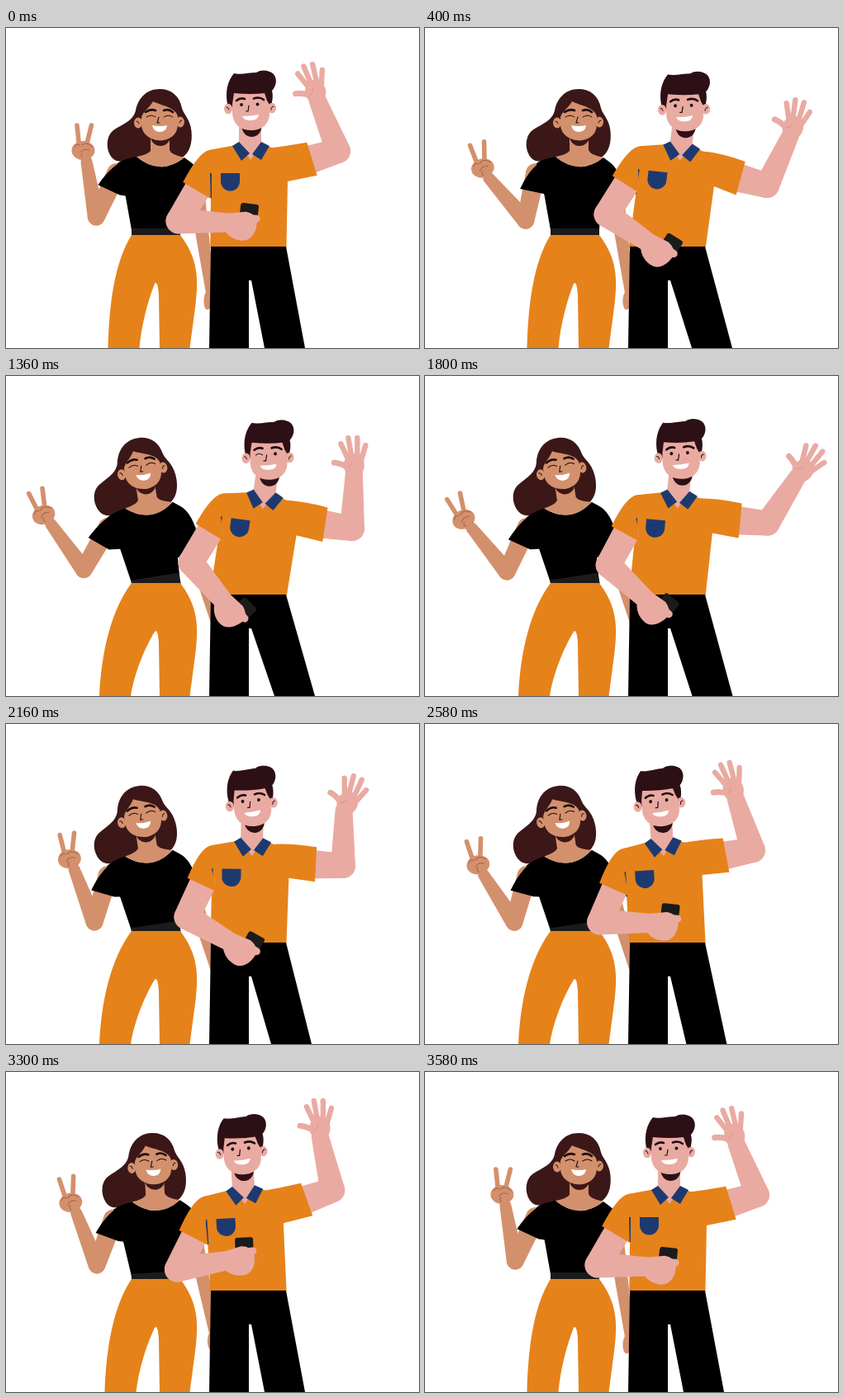
An HTML page with a canvas for the animation above (3.6 s loop, 500 by 388 pixels).

```html
<!DOCTYPE html>
<html lang="en">
<head>
<meta charset="utf-8">
<title>Waving friends</title>
<style>
html, body { margin: 0; width: 100%; height: 100%; overflow: hidden; background: #fff; }
canvas { display: block; width: 500px; height: 388px; }
</style>
</head>
<body>
<canvas id="stage" width="500" height="388"></canvas>
<script>
const LOOP = 3600, RAD = Math.PI / 180;
const ctx = document.getElementById('stage').getContext('2d');
const ORANGE = '#e6821a', BLACK = '#000', NAVY = '#1d3a70', BELT = '#1b1b1b';
const TAN = '#d3906c', TAN_LINE = '#a95f45', PINK = '#e9aaa2';
const HAIR_W = '#3b1718', HAIR_M = '#2d1016', INK = '#1c0c10';

// Each track is [time, value] pairs, smoothly joined, at rest at the loop ends.
const tracks = {
  wLean: [[0, 0], [400, 0], [860, -4.7], [1360, -8.6], [2500, -8.6], [3020, -7]],
  wUpper: [[0, 25], [400, 12], [860, 16.6], [1360, 30], [1640, 28], [2160, 16.3], [3020, 15]],
  wFore: [[0, 10], [400, 41], [620, 47], [860, 40], [1180, 32], [1360, 36], [1640, 43], [2160, 21], [2300, 18], [2800, 43], [3020, 37]],
  wHand: [[0, 0], [400, -15], [860, -28], [1200, -20], [1360, -21], [1700, -28], [2160, -8], [2400, -4], [2850, -28], [3020, -26]],
  mLean: [[0, 0], [400, 6.7], [700, 8], [1400, 8], [2160, 1], [3020, -7]],
  mLeg: [[0, 0], [400, 10], [700, 12], [1400, 12], [2160, 8], [3020, 0]],
  mTilt: [[0, 0], [1500, 0], [2160, -4], [3020, -5]],
  waveX: [[0, 402], [400, 414], [700, 416], [860, 416], [1360, 419], [2160, 408], [3020, 389]],
  waveY: [[0, 149], [400, 191], [700, 193], [860, 193], [1360, 185], [2160, 172], [3020, 138]],
  waveFore: [[0, -22], [400, 25], [620, 33], [860, 21], [1250, 1], [1360, 2], [1800, 33], [2160, 1], [2450, -20], [3020, -8], [3100, -8]],
  waveHand: [[0, -13], [400, 17], [800, 60], [860, 60], [1360, 0], [1450, -2], [1900, 45], [2160, 25], [2550, -15], [3020, 2], [3150, 4]],
  holdX: [[0, 209], [400, 220], [700, 224], [1400, 224], [2160, 219], [3020, 206]],
  holdY: [[0, 234], [400, 226], [700, 226], [1400, 226], [2160, 234], [3020, 244]],
  holdFore: [[0, 2], [400, 34], [700, 50], [1400, 50], [2160, 30], [3020, -21]]
};
for (const k in tracks) tracks[k].push([LOOP, tracks[k][0][1]]);

function slope(keys, i) {
  if (i === 0 || i === keys.length - 1) return 0;
  const [a, b, c] = [keys[i - 1], keys[i], keys[i + 1]];
  const d1 = (b[1] - a[1]) / (b[0] - a[0]), d2 = (c[1] - b[1]) / (c[0] - b[0]);
  return d1 * d2 <= 0 ? 0 : 2 * d1 * d2 / (d1 + d2);
}

function sample(keys, t) {
  let i = 0;
  while (i < keys.length - 2 && t >= keys[i + 1][0]) i++;
  const [t0, v0] = keys[i], [t1, v1] = keys[i + 1], h = t1 - t0, u = (t - t0) / h;
  const u2 = u * u, u3 = u2 * u;
  return v0 * (2 * u3 - 3 * u2 + 1) + v1 * (3 * u2 - 2 * u3)
    + h * (slope(keys, i) * (u3 - 2 * u2 + u) + slope(keys, i + 1) * (u3 - u2));
}

function turn(x, y, deg, draw) {
  ctx.save();
  ctx.translate(x, y);
  ctx.rotate(deg * RAD);
  ctx.translate(-x, -y);
  draw();
  ctx.restore();
}

function place(x, y, deg, draw) {
  ctx.save();
  ctx.translate(x, y);
  ctx.rotate(deg * RAD);
  draw();
  ctx.restore();
}

function spin(x, y, cx, cy, deg) {
  const c = Math.cos(deg * RAD), s = Math.sin(deg * RAD);
  return [cx + (x - cx) * c - (y - cy) * s, cy + (x - cx) * s + (y - cy) * c];
}

function fill(d, color) {
  ctx.fillStyle = color;
  ctx.fill(new Path2D(d));
}

function line(d, color, width, cap = 'round') {
  ctx.strokeStyle = color;
  ctx.lineWidth = width;
  ctx.lineCap = cap;
  ctx.lineJoin = 'round';
  ctx.stroke(new Path2D(d));
}

function oval(x, y, rx, ry, color, deg = 0) {
  ctx.fillStyle = color;
  ctx.beginPath();
  ctx.ellipse(x, y, rx, ry, deg * RAD, 0, 2 * Math.PI);
  ctx.fill();
}

// Tapered limb: the hull of two circles.
function limb([x1, y1], r1, [x2, y2], r2, color) {
  const a = Math.atan2(y2 - y1, x2 - x1);
  const b = Math.acos((r1 - r2) / Math.hypot(x2 - x1, y2 - y1));
  ctx.fillStyle = color;
  ctx.beginPath();
  ctx.arc(x1, y1, r1, a + b, a - b + 2 * Math.PI);
  ctx.arc(x2, y2, r2, a - b, a + b);
  ctx.fill();
}

// Point at a distance from p; angle 0 is up, positive to the right.
const reach = ([x, y], deg, len) => [x + Math.sin(deg * RAD) * len, y - Math.cos(deg * RAD) * len];

// Hem of a sleeve lying back from the elbow along angle a.
function hem([x, y], a, back, half) {
  const c = Math.cos(a), s = Math.sin(a), mx = x - c * back, my = y - s * back;
  return { mid: [mx, my], left: [mx + s * half, my - c * half], right: [mx - s * half, my + c * half] };
}

function womanHead() {
  oval(187, 131, 12, 12, HAIR_W);
  oval(160, 115, 5, 6.5, TAN);
  oval(211, 114, 5, 6.5, TAN);
  fill('M164 108C166 101 173 98 178 89C188 94 205 96 208 107V118C207 130 198 136 187 136.5C176 136 165 130 164 118Z', TAN);
  line('M158 113q2-1 3 3M213 112q-2-1-3 3', INK, 1);
  line('M169 102Q175 97.500 181 100M191 100Q197 97.500 202 102', INK, 2.6);
  line('M170 108Q176 104 181 108M191 108Q197 104 202 108', INK, 1);
  line('M185 108L183 115H186', INK, 1.1);
  fill('M177 118Q187 120 195 118Q194 126 186 126Q179 126 177 118Z', '#fff');
}

function peaceHand() {
  line('M-9-20L-11.500-44', TAN, 5.6);
  line('M0-20L6-44', TAN, 5.6);
  oval(-4, -13.5, 14, 11.5, TAN);
  line('M-14-18Q-12-23-8-20M-6-20Q0-25 7-18M-8-11Q-4-17 3-14M-5-10Q-8-7-5-5', TAN_LINE, 1);
}

function woman(p) {
  const px = 181, py = 250, lean = p.wLean;
  turn(px, py, lean, () => {
    limb([230, 195], 10, [247, 318], 5.5, TAN);
    oval(245, 329, 5.5, 12.5, TAN, 6);
    fill('M186 74C170 74 160 85 157 100C154 113 140 117 130 124C121 131 120 148 129 158C136 165 150 161 160 156L212 158C222 152 226 140 224.500 125C223 110 215 105 213 97C210 82 200 74 186 74Z', HAIR_W);
  });
  const shoulder = spin(134, 176, px, py, lean);
  const elbow = reach(shoulder, 180 + p.wUpper, 58.5);
  const wrist = reach(elbow, -p.wFore, 68);
  limb(shoulder, 12, elbow, 10.5, TAN);
  limb(elbow, 10.5, wrist, 7, TAN);
  place(...wrist, p.wHand, peaceHand);
  const a = Math.atan2(elbow[1] - shoulder[1], elbow[0] - shoulder[0]);
  const h = hem(elbow, a, 36, 14.5);
  const top = spin(150, 158, px, py, lean), bend = spin(130, 163, px, py, lean);
  const pit = spin(148, 204, px, py, lean), mid = spin(165, 175, px, py, lean);
  fill(`M${top}Q${bend} ${h.right}L${h.left}L${pit}L${mid}Z`, BLACK);
  turn(px, py, lean, () => {
    fill('M158 156Q142 159 135 164L144 200L152 245H211L212 225L230 215L239 195Q236 172 224 163L216 157Q187 180 158 156Z', BLACK);
    fill('M152 243H211V258H152Z', BELT);
    fill('M175 130V149Q171 154 158 156Q187 180 216 157Q200 154 198 148V130Z', TAN);
    womanHead();
  });
  const s = lean * 1.22;
  fill(`M152 251H211C233 280 233 305 229.500 335L222.500 388H186L185 325Q184 306 180 310C${172 + s * .4} 330 ${164 + s * .8} 360 ${161.5 + s} 388H${123.5 + s}C${125 + s * .9} 335 ${131 + s * .4} 285 152 251Z`, ORANGE);
}

function manHead(wink) {
  oval(297.5, 119, 12, 13, HAIR_M);
  fill('M268 92C265 76 269 63 276 55C283 57 295 54 303 54C309 50 319 51 324 56C329 62 327 71 322 76C324 83 322 91 320 98L272 98Z', HAIR_M);
  oval(269, 98, 5, 6.3, PINK);
  oval(322, 97, 5, 6.3, PINK);
  fill('M274 92L276 79Q297 81 313 79L316 88L319 93V105C318 119 307 124 297 124C284 124 275 117 274 104Z', PINK);
  line('M267 96q2-1 3 3M324 95q-3 0-3 4', INK, 1);
  line('M279 88Q284 84 289 86M300 85.500Q307 83 312 87', INK, 2.6);
  if (wink) line('M281 94Q285 91 289 94', INK, 1.1);
  else oval(285, 93, 1.9, 2.1, INK);
  oval(304.5, 92.5, 1.9, 2.1, INK);
  line('M294 94L293 101H290.500', INK, 1.2);
  fill('M286 107Q297 107 306 105Q305 112 297 112Q288 112.500 286 107Z', '#fff');
}

function openHand() {
  oval(0, -10, 12.5, 14.5, PINK);
  line('M-7-17L-16-36M-3-20L-7-43M4-20L4-43M9-17L14-34', PINK, 6.4);
  line('M-6-6Q-14-12-24-13', PINK, 7);
  line('M-8-7Q-3-9-2-14', '#d98d88', .8);
}

function holdHand(fore) {
  place(24, -16, 5 - fore * .2, () => {
    ctx.fillStyle = BELT;
    ctx.beginPath();
    ctx.roundRect(-11, -8, 22, 18, 3);
    ctx.fill();
  });
  fill('M-4-11L20-14Q31-12 34-4C34 12 27 21 17 21C8 21 1 17-4 11Z', PINK);
  line('M18-6H33', PINK, 9);
}

function man(p, wink) {
  const px = 294, py = 265, lean = p.mLean;
  const at = (x, y) => spin(x, y, px, py, lean);

  const elbow = [p.waveX, p.waveY], sh = at(341, 161);
  const a = Math.atan2(elbow[1] - sh[1], elbow[0] - sh[0]) - 6 * RAD;
  const cuff = hem(elbow, a, 33, 21);
  const wrist = reach(elbow, p.waveFore, 67);
  limb(cuff.mid, 17, elbow, 15, PINK);
  limb(elbow, 15, wrist, 10.5, PINK);
  place(...wrist, p.waveHand, openHand);

  ctx.save();
  ctx.beginPath();
  ctx.rect(0, 0, 500, 266);
  ctx.clip();
  fill(`M${at(300, 148)}L${at(316, 146)}Q${at(340, 143)} ${cuff.left}L${cuff.right}L${at(341, 186)}L${at(300, 200)}Z`, ORANGE);
  turn(px, py, lean, () => {
    fill('M278 142L246 148L240 165L248 205L247 290H339L341 186L335 150L316 143Z', ORANGE);
    line('M248 176V206', NAVY, 2, 'butt');
    fill('M260 176H283V186A11.500 11.500 0 0 1 260 186Z', NAVY);
  });
  ctx.restore();

  const s = p.mLeg;
  fill(`M248 265H339L${362 + s} 388H${313 + s}L297 306H294V388H246Z`, BLACK);

  turn(px, py, lean, () => {
    fill('M282 112H309V142L296 160L282 141Z', PINK);
    fill('M274 143L282 138L295 152L285 161ZM309 138L319 143L309 160L298 153Z', NAVY);
    turn(296, 110, p.mTilt - lean, () => manHead(wink));
  });

  const bend = [p.holdX, p.holdY], root = at(250, 165);
  const b = Math.atan2(bend[1] - root[1], bend[0] - root[0]);
  const sleeve = hem(bend, b, 43, 19.5);
  const grip = reach(bend, p.holdFore + 90, 61);
  limb(sleeve.mid, 16, bend, 15.5, PINK);
  limb(bend, 15.5, grip, 11.5, PINK);
  place(...grip, p.holdFore, () => holdHand(p.holdFore));
  fill(`M${at(262, 146)}L${at(246, 148)}Q${at(233, 151)} ${sleeve.right}L${sleeve.left}L${at(247, 175)}Z`, ORANGE);
}

function frame() {
  const t = performance.now() % LOOP, pose = {};
  for (const k in tracks) pose[k] = sample(tracks[k], t);
  ctx.fillStyle = '#fff';
  ctx.fillRect(0, 0, 500, 388);
  woman(pose);
  man(pose, t > 1250 && t < 1560);
  requestAnimationFrame(frame);
}
frame();
</script>
</body>
</html>
```
